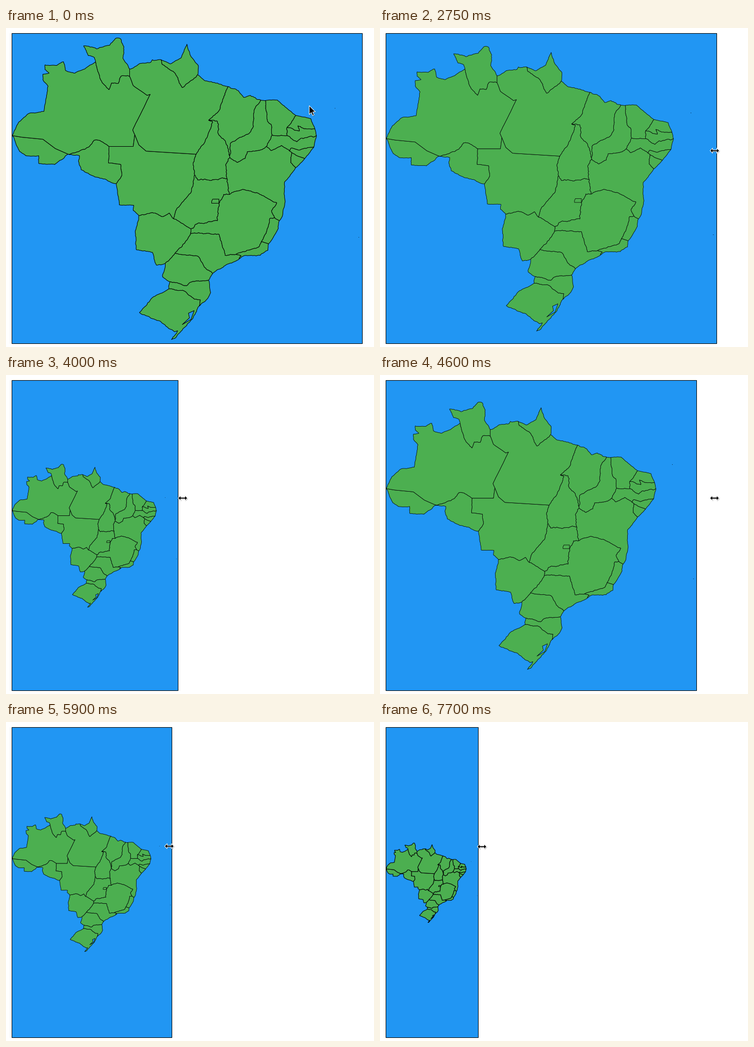
A matplotlib script that plays this animation: 713x618 px, repeating every 8000 ms.

```python
import math
import random

import matplotlib.pyplot as plt
import numpy as np
from matplotlib.animation import FuncAnimation
from matplotlib.patches import Polygon, Rectangle
from matplotlib.path import Path
from matplotlib.transforms import Affine2D

W, H, DPI = 713, 618, 100
STEP, LOOP = 50, 8000
SEA, LAND, HOVER = "#2196f3", "#4caf50", "#f44336"
LEFT, TOP, RIGHT, BOTTOM = 11, 10, 690, 611
MIDDLE = 311
PX = 72 / DPI

rng = random.Random(7)
borders = []


def wander(a, b, rough):
    """Fractal line from a to b (without a) by midpoint displacement."""
    length = math.dist(a, b)
    if length < 3.5 or not rough:
        return [b]
    push = rng.uniform(-1, 1) * min(rough, 0.12 * rough * length) / length
    mid = ((a[0] + b[0]) / 2 - (b[1] - a[1]) * push,
           (a[1] + b[1]) / 2 + (b[0] - a[0]) * push)
    return wander(a, mid, rough) + wander(mid, b, rough)


def border(pair, *xy, rough=1.0):
    """Store the line between two states; '-' stands for the outside."""
    points = list(zip(xy[::2], xy[1::2]))
    line = points[:1]
    for a, b in zip(points, points[1:]):
        line += wander(a, b, rough)
    borders.append((pair.split(), line))


def outline(state):
    """Join all borders of a state end to end."""
    parts = [line for pair, line in borders if state in pair]
    ring = list(parts.pop(0))
    while parts:
        def gap(line):
            return min(math.dist(ring[-1], line[0]), math.dist(ring[-1], line[-1]))
        line = min(parts, key=gap)
        parts.remove(line)
        forward = math.dist(ring[-1], line[0]) <= math.dist(ring[-1], line[-1])
        ring += line if forward else line[::-1]
    return ring


# Outer edge, clockwise from the western tip
border("AM -", 12, 208, 25, 181, 44, 165, 73, 161, 81, 112, 71, 100, 71, 89,
       83, 87, 75, 80, 75, 71, 98, 72, 111, 65, 115, 82, 133, 87, 152, 79,
       173, 65, rough=0.8)
border("RR -", 173, 65, 171, 57, 159, 53, 150, 34, 175, 40, 200, 33, 213, 19,
       221, 20, 228, 36, 226, 58, 239, 79)
border("PA -", 239, 79, 256, 70, 280, 66, 283, 61, 300, 61)
border("AP -", 300, 61, 318, 69, 338, 58, 350, 31, 357, 53, 372, 72, 371, 90,
       rough=0.7)
border("PA -", 371, 90, 388, 102, 412, 108, 430, 113, rough=1.3)
border("MA -", 430, 113, 450, 121, 460, 134, 473, 130, 493, 139, rough=1.8)
border("PI -", 493, 139, 502, 140)
border("CE -", 502, 140, 525, 139, 561, 169, rough=0.5)
border("RN -", 561, 169, 590, 175, 598, 195, rough=0.5)
border("PB -", 598, 195, 601, 208, rough=0.5)
border("PE -", 601, 208, 596, 230, rough=0.5)
border("AL -", 596, 230, 578, 253, rough=0.5)
border("SE -", 578, 253, 561, 270, rough=0.5)
border("BA -", 561, 270, 539, 298, 540, 333, 535, 364, 529, 373, rough=0.7)
border("ES -", 529, 373, 527, 388, 508, 418, rough=0.7)
border("RJ -", 508, 418, 507, 430, 492, 440, 460, 441, 451, 447)
border("SP -", 451, 447, 425, 459, 400, 475)
border("PR -", 400, 475, 392, 488)
border("SC -", 392, 488, 396, 512, 390, 524, 374, 538, rough=0.7)
border("RS -", 374, 538, 360, 564, 326, 601, 320, 603, 332, 586, 326, 588,
       314, 581, 300, 569, 284, 563, 258, 551, 280, 525, 315, 505)
border("SC -", 315, 505, 317, 491)
border("PR -", 317, 491, 303, 482, 308, 456)
border("MS -", 308, 456, 291, 459, 283, 434, 252, 429, 250, 397, 257, 363)
border("MT -", 257, 363, 246, 353, 247, 343, 219, 342, 213, 301, rough=0.5)
border("RO -", 213, 301, 188, 292, 163, 284, 145, 274, 141, 262, 142, 247, 120, 244)
border("AC -", 120, 244, 94, 264, 63, 262, 63, 247, 38, 247, 26, 239, 12, 208,
       rough=0.8)

# North
border("AC AM", 12, 208, 30, 211, 71, 215, 95, 233, 120, 244, rough=0)
border("AM RO", 120, 244, 142, 238, 160, 230, 170, 217, 179, 217, 199, 229)
border("AM MT", 199, 229, 246, 229, 249, 206, rough=0)
border("AM PA", 249, 206, 245, 197, 279, 128, 273, 130, 246, 111, 239, 93, rough=0.2)
border("RR PA", 239, 79, 239, 93, rough=0)
border("RR AM", 239, 93, 222, 93, 217, 107, 204, 106, 199, 119, 183, 100, 173, 65)
border("PA AP", 300, 61, 302, 70, 326, 86, 341, 115, 361, 100, 371, 90)
border("PA MT", 249, 206, 257, 226, 271, 238, 368, 244, rough=0)
border("PA TO", 368, 244, 384, 222, 400, 181, 392, 178)
border("PA MA", 392, 178, 414, 157, 430, 113)
border("RO MT", 199, 229, 198, 261, 222, 264, 224, 285, 213, 301, rough=0.5)

# North-east
border("TO MA", 392, 178, 409, 180, 411, 205, 425, 220, 433, 250, rough=1.6)
border("MA PI", 493, 139, 480, 160, 479, 190, 472, 202, 435, 222, 433, 250)
border("PI CE", 502, 140, 506, 180, 513, 186, 515, 207)
border("PI PE", 515, 207, 504, 229)
border("PI BA", 504, 229, 496, 235, 467, 239, 463, 252, 448, 260, 433, 250)
border("TO BA", 433, 250, 425, 265, 428, 292, rough=1.8)
border("CE RN", 561, 169, 544, 192)
border("CE PB", 544, 192, 544, 208)
border("CE PE", 515, 207, 544, 208)
border("RN PB", 544, 192, 568, 199, 565, 189, 574, 193, 598, 195, rough=1.5)
border("PB PE", 544, 208, 563, 220, 571, 213, 601, 208, rough=1.5)
border("PE BA", 504, 229, 513, 237, 533, 227, 549, 238)
border("PE AL", 549, 238, 552, 232, 566, 236, 596, 230)
border("BA AL", 549, 238, 553, 241)
border("AL SE", 553, 241, 578, 253)
border("BA SE", 553, 241, 551, 260, 561, 270)

# Centre
border("MT TO", 368, 244, 362, 262, 365, 284)
border("TO GO", 365, 284, 371, 294, 400, 293, 428, 292, rough=1.8)
border("GO BA", 428, 292, 432, 322, rough=1.5)
border("MT GO", 365, 284, 358, 318, 330, 350, 324, 369)
border("MT MS", 257, 363, 283, 357, 303, 365, 316, 358, 324, 369)
border("MS GO", 324, 369, 358, 389)
border("GO MG", 358, 389, 371, 378, 409, 373, 414, 335, 421, 322, 432, 322, rough=1.5)
border("BA MG", 432, 322, 458, 312, 489, 320, 524, 338, 514, 353, 520, 367)
border("BA ES", 520, 367, 529, 373)
border("DF DF", 400, 331, 412, 331, 412, 339, 398, 339, 398, 335, 400, 331, rough=0)

# South-east and south
border("MG ES", 520, 367, 511, 368, 507, 386, 494, 414)
border("ES RJ", 494, 414, 508, 418)
border("MG RJ", 494, 414, 489, 424, 445, 438)
border("RJ SP", 445, 438, 455, 441, 451, 447)
border("MG SP", 445, 438, 424, 440, 412, 399, 378, 397, 357, 398)
border("MS MG", 358, 389, 357, 398)
border("MS SP", 357, 398, 338, 425, 327, 436)
border("SP PR", 327, 436, 372, 442, 384, 463, 400, 475)
border("MS PR", 327, 436, 308, 456)
border("PR SC", 317, 491, 349, 499, 357, 492, 392, 488)
border("SC RS", 315, 505, 345, 509, 365, 525, 376, 526, 374, 538)

LAGOON = [(364, 547), (353, 552), (355, 561), (341, 574), (358, 564)]
ISLANDS = [(637, 155), (683, 405)]

fig = plt.figure(figsize=(W / DPI, H / DPI), dpi=DPI, facecolor="white")
ax = fig.add_axes([0, 0, 1, 1])
ax.set_xlim(-0.5, W - 0.5)
ax.set_ylim(H - 0.5, -0.5)
ax.axis("off")

panel = ax.add_patch(Rectangle((LEFT, TOP), RIGHT - LEFT, BOTTOM - TOP,
                               fc=SEA, ec="black", lw=PX, snap=False))
zoom = Affine2D()


def add_shape(points, color):
    return ax.add_patch(Polygon(points, fc=color, ec="black", joinstyle="round",
                                snap=False, transform=zoom + ax.transData))


codes = sorted({code for pair, _ in borders for code in pair} - {"-", "DF"}) + ["DF"]
rings = {code: outline(code) for code in codes}
states = {code: add_shape(ring, LAND) for code, ring in rings.items()}
areas = {code: Path(ring) for code, ring in rings.items()}
lagoon = add_shape(LAGOON, SEA)
for x, y in ISLANDS:
    add_shape([(x - .4, y), (x, y + .4), (x + .4, y)], "black").set_linewidth(0.3)

ARROW = np.array([(0, 0), (0, 17), (4, 13.2), (6.7, 19.2), (9.4, 18),
                  (6.8, 12.2), (12, 12)])
HALF = np.array([(-4, -1.5), (-4, -5), (-9, 0), (-4, 5), (-4, 1.5)])
RESIZE = np.vstack([HALF, -HALF])
shadow = ax.add_patch(Polygon(ARROW, fc="black", ec="none", alpha=0.25, zorder=4))
cursor = ax.add_patch(Polygon(ARROW, fc="black", ec="white", lw=PX, zorder=5))

# Pointer moves: start, end, goal and ease-out power
START = (587, 150)
MOVES = [
    (0, 850, (470, 372), 1),
    (850, 1200, (557, 233), 1),
    (1200, 1700, (689, 234), 1),
    (2000, 2200, (699, 237), 1),
    (2550, 3950, (342, 238), 1),
    (4000, 4650, (673, 238), 1),
    (4650, 5050, (340, 238), 1),
    (5100, 5550, (617, 238), 1),
    (5550, 5850, (330, 240), 1),
    (5850, 6750, (199, 241), 2),
    (7400, 7600, (197, 241), 1),
]
OVER_EDGE, RESIZING, GRAB = 2050, 2600, 9
RELEASE, REDRAW = 7400, 7450


def pointer(t):
    spot = np.array(START, float)
    for start, end, goal, power in MOVES:
        k = min(max((t - start) / (end - start), 0), 1)
        spot += (np.array(goal) - spot) * (1 - (1 - k) ** power)
    return spot


def right_edge(t):
    """The panel edge follows the pointer one step late."""
    if t < RESIZING:
        return RIGHT
    return round(pointer(min(t, RELEASE) - STEP)[0] - GRAB)


def update(frame):
    t = frame * STEP
    edge = right_edge(t)
    panel.set_width(edge - LEFT)
    scale = (edge - LEFT) / (RIGHT - LEFT)
    zoom.clear().translate(-LEFT, -MIDDLE).scale(scale).translate(LEFT, MIDDLE)

    width = (0.75 if RESIZING <= t < REDRAW else 1) * PX
    spot = pointer(t - STEP)
    for code, shape in states.items():
        hovered = t < OVER_EDGE and areas[code].contains_point(spot)
        shape.set_facecolor(HOVER if hovered else LAND)
        shape.set_linewidth(width)
    lagoon.set_linewidth(width)

    place = pointer(t) + (ARROW if t < OVER_EDGE else RESIZE)
    cursor.set_xy(place)
    shadow.set_xy(place + 1.3)
    return []


anim = FuncAnimation(fig, update, frames=LOOP // STEP, interval=STEP,
                     repeat=True, repeat_delay=0, blit=False)
plt.show()
```
